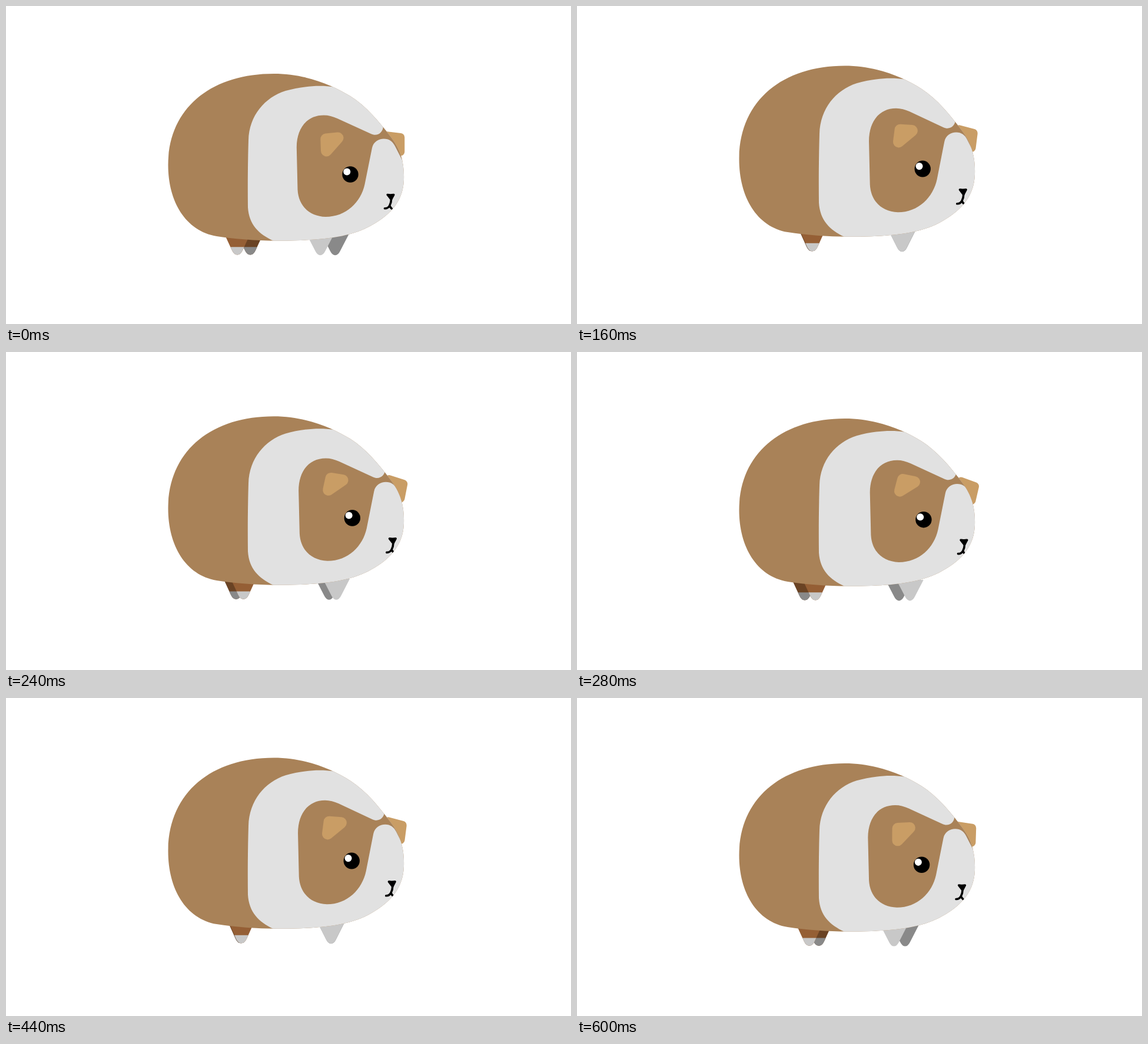
Write an HTML page that moves like this. It is 960 by 540 pixels and loops after 0.64 s.

```html
<!DOCTYPE html>
<html lang="en">
<head>
<meta charset="utf-8">
<title>Walking guinea pig</title>
<style>
  html, body { margin: 0; width: 100%; height: 100%; overflow: hidden; background: #fff; }
  svg { display: block; width: 960px; height: 540px; }
  .fur { fill: #a98258; }
  .white { fill: #e1e1e1; }
  .ear { fill: #c99d65; stroke: #c99d65; stroke-linejoin: round; }
  .line { fill: none; stroke: #000; stroke-width: 3.6; stroke-linecap: round; stroke-linejoin: round; }
</style>
</head>
<body>
<svg viewBox="0 0 960 540">
  <defs>
    <path id="body" d="M455 115C510 115 556 135 585 153C612 170 634 196 655 224C670 244 677 265 676 295C675 328 657 353 620 373C585 393 535 398 470 398.5C430 399 392 396 358 391C305 382 275.5 332 275.5 270C275.5 174 348 115 455 115Z"/>
    <clipPath id="inside"><use href="#body"/></clipPath>
    <path id="foreLeg" d="M-23 388L-8.5 416Q-5 423.3 0 423.3Q5 423.3 8.5 416L23 388Z"/>
    <path id="hindLeg" d="M-21.5 388L-9 415Q-5.5 422.5 0 422.5Q5.5 422.5 9 415L21.5 388Z"/>
    <path id="sock" d="M-11.6 409.3L-9 415Q-5.5 422.5 0 422.5Q5.5 422.5 9 415L11.6 409.3Z"/>
  </defs>
  <g id="pig">
    <g id="hindFar"><use href="#hindLeg" fill="#6a4324"/><use href="#sock" fill="#898989"/></g>
    <g id="hindNear"><use href="#hindLeg" fill="#955f35"/><use href="#sock" fill="#c8c8c8"/></g>
    <use id="foreFar" href="#foreLeg" fill="#898989"/>
    <use id="foreNear" href="#foreLeg" fill="#c8c8c8"/>
    <path id="earFar" class="ear" stroke-width="14" d="M645 220L670.3 223L670.3 247.5L650 238Z"/>
    <use href="#body" class="fur"/>
    <g clip-path="url(#inside)">
      <path class="white" d="M557 137.5C530 133.5 500 137 475 144C440 155 413 186 412 228C411 260 410.5 300 411 342C413 372 430 388 457 400L720 420L720 137Z"/>
      <g id="face">
        <path class="fur" d="M493.8 240C494 207 511.500 185.500 540 185.500C548 185.500 555 187.500 563 191L620 217C630 222 641 216 641 203L645 188L710 190L700 275L680 275L661 238C657 230 651 225.500 642 225.500C633 225.500 624 231 622 241L609.500 303C603 333 578 358 543 358C516 357 497 340 495.500 312Z"/>
        <path id="earNear" class="ear" stroke-width="19" d="M543.8 226L564 224L544.500 246Z"/>
        <circle cx="585" cy="286" r="13.7"/>
        <circle cx="579.3" cy="281.6" r="6" fill="#fff"/>
        <path class="line" style="fill:#000" d="M648.2 320.5Q653 321.5 658.8 320.5L654.5 328.500Z"/>
        <path class="line" d="M654.5 328.500Q654.500 334 651.800 339Q649 344 643.500 343.800M651.800 339Q653 342 655.200 343.800"/>
      </g>
    </g>
  </g>
</svg>
<script>
  const LOOP = 640, STEP = 40;
  // stride over time: -1 = near legs apart, 1 = far legs apart
  const STRIDE = [[0, -1], [300, 1], [440, .07], [560, -.5], [600, -.73], [640, -1]];
  const parts = {};
  document.querySelectorAll('svg [id]').forEach(el => parts[el.id] = el);
  const place = (id, value) => parts[id].setAttribute('transform', value);
  const slide = (id, x) => place(id, `translate(${x} 0)`);

  function strideAt(t) {
    const i = STRIDE.findIndex(([end]) => end > t);
    const [t0, s0] = STRIDE[i - 1], [t1, s1] = STRIDE[i];
    return s0 + (s1 - s0) * (t - t0) / (t1 - t0);
  }

  function draw(t) {
    const s = strideAt(t);
    const lift = 1 - Math.abs(s);
    const turn = (s + 1) / 2;
    place('pig', `matrix(1 0 0 ${1 + .0256 * lift} 0 ${-17.44 * lift})`);
    slide('foreNear', 551 + 17 * s);
    slide('foreFar', 552.8 - 6.5 * s);
    slide('hindNear', 399.5 + 6.5 * s);
    slide('hindFar', 400 - 15 * s);
    slide('face', 4.2 * turn);
    place('earNear', `rotate(${18 * turn} 573 242)`);
    place('earFar', `translate(${4.2 * turn} 0) rotate(${14 * turn} 642 234)`);
  }

  const start = performance.now();
  function tick() {
    const t = (performance.now() - start) % LOOP;
    draw(Math.floor(t / STEP) * STEP);
    requestAnimationFrame(tick);
  }
  tick();
</script>
</body>
</html>
```
